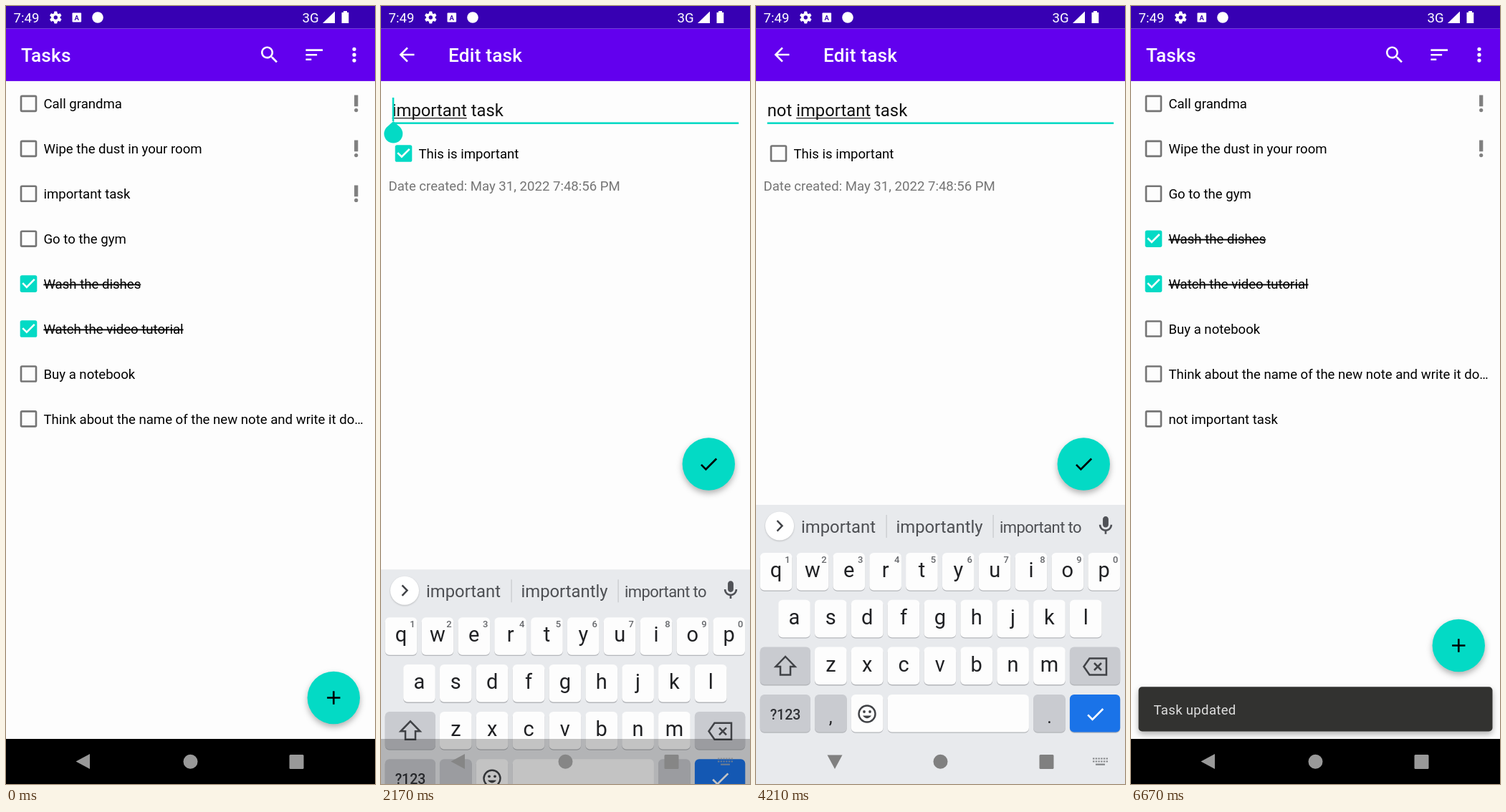
Recreate the animation shown at these times as an HTML page. Size 515 by 1087 pixels, loop 6.79 s.

```html
<!DOCTYPE html>
<html lang="en">
<head>
<meta charset="utf-8">
<title>Tasks</title>
<style>
  html, body { margin: 0; width: 100%; height: 100%; overflow: hidden; background: #fdfdfd; }
  svg { display: block; width: 100vw; height: 100vh; }
  text { font-family: Roboto, "Noto Sans", sans-serif; font-size: 18.6px; white-space: pre; }
  .bar { font-size: 26.2px; font-weight: 500; letter-spacing: .2px; fill: #fff; }
  .input { font-size: 23.84px; fill: #111; }
  .done { text-decoration: line-through; text-decoration-thickness: 1.2px; }
  .key { font-size: 29px; fill: #202124; text-anchor: middle; }
  .hint { font-size: 13px; font-weight: 500; fill: #66686c; text-anchor: middle; }
  .sug { font-size: 23.84px; fill: #4d4f53; text-anchor: middle; }
  .tight { font-size: 22px; letter-spacing: -.6px; }
  .line { fill: none; stroke: #404246; stroke-width: 2.5; }
  .lift { filter: drop-shadow(0 4px 4px rgba(0, 0, 0, .3)); }
</style>
</head>
<body>
<svg id="stage" viewBox="0 0 515 1087"></svg>
<script>
const LOOP = 6790, TEAL = '#03dac5', DP = 1.3113;
const T = { open: 1250, focus: 1960, kbIn: 2028, resize: 2060, uncheck: 3900, save: 4630, snack: 4650 };

// [time, text typed before the old title]
const TYPED = [[0, ''], [2760, 'n'], [2930, 'no'], [3070, 'not'], [3380, 'not ']];
// [time, suggestions, underline start, underline length]
const THREE = ['important', 'importantly', 'important to'];
const HELP = [
  [0, THREE, 0, 9], [2830, ['nimportant'], 0, 10], [3000, ['noimportant'], 0, 11],
  [3140, ['notimportant'], 0, 12], [3460, THREE, 4, 9]
];

const ICON = {
  search: 'M15.5 14h-.79l-.28-.27C15.41 12.59 16 11.11 16 9.5 16 5.91 13.09 3 9.5 3S3 5.91 3 9.5 5.91 16 9.5 16c1.61 0 3.09-.59 4.23-1.57l.27.28v.79l5 4.99L20.49 19zM9.5 14C7.01 14 5 11.99 5 9.5S7.01 5 9.5 5 14 7.01 14 9.5 11.99 14 9.5 14z',
  sort: 'M3 18h6v-2H3zM3 6v2h18V6zM3 13h12v-2H3z',
  more: 'M10 6a2 2 0 1 0 4 0a2 2 0 1 0-4 0M10 12a2 2 0 1 0 4 0a2 2 0 1 0-4 0M10 18a2 2 0 1 0 4 0a2 2 0 1 0-4 0',
  back: 'M20 11H7.83l5.59-5.59L12 4l-8 8 8 8 1.41-1.41L7.83 13H20z',
  check: 'M9 16.17L4.83 12l-1.42 1.41L9 19 21 7l-1.41-1.41z',
  plus: 'M19 13h-6v6h-2v-6H5v-2h6V5h2v6h6z',
  tick: 'M10 17l-5-5 1.41-1.41L10 14.17l7.59-7.59L19 8z',
  high: 'M10 3h4v12h-4zM10 19a2 2 0 1 0 4 0a2 2 0 1 0-4 0',
  mic: 'M12 14c1.66 0 3-1.34 3-3V5c0-1.66-1.34-3-3-3S9 3.34 9 5v6c0 1.66 1.34 3 3 3zm5-3c0 2.76-2.24 5-5 5s-5-2.24-5-5H5c0 3.53 2.61 6.43 6 6.92V21h2v-3.08c3.39-.49 6-3.39 6-6.92z'
};

const at = (x, y) => `transform="translate(${x} ${y})"`;
const rect = (x, y, w, h, fill, r = 0, more = '') =>
  `<rect x="${x}" y="${y}" width="${w}" height="${h}" rx="${r}" fill="${fill}" ${more}/>`;
const circle = (x, y, r, fill, more = '') => `<circle cx="${x}" cy="${y}" r="${r}" fill="${fill}" ${more}/>`;
const text = (x, y, s, cls = '', more = '') => `<text x="${x}" y="${y}" class="${cls}" ${more}>${s}</text>`;
const path = (d, more = 'class="line"') => `<path d="${d}" ${more}/>`;
const group = (id, body, more = '') => `<g id="${id}" ${more}>${body}</g>`;
const unit = (x, y, body) => `<g transform="translate(${x} ${y}) scale(${DP}) translate(-12 -12)">${body}</g>`;
const icon = (name, x, y, fill = '#fff') => unit(x, y, path(ICON[name], `fill="${fill}"`));

const box = (y, on) => unit(31.5, y, on
  ? rect(3, 3, 18, 18, TEAL, 2) + path(ICON.tick, 'fill="#fff"')
  : rect(4, 4, 16, 16, 'none', 1, 'stroke="#757575" stroke-width="2"'));

const row = ([label, flag], i) => {
  const y = 136.4 + 62.93 * i, done = flag === 'done';
  return box(y, done) + text(52.4, y + 7, label, done ? 'done' : '') +
    (flag === 'high' ? icon('high', 488.7, y, '#808080') : '');
};

const TOP = [['Call grandma', 'high'], ['Wipe the dust in your room', 'high']];
const REST = [
  ['Go to the gym'], ['Wash the dishes', 'done'], ['Watch the video tutorial', 'done'],
  ['Buy a notebook'], ['Think about the name of the new note and write it do…']
];
const rows = list => list.map(row).join('');

const fab = (id, name) => group(id, circle(0, 0, 36.7, TEAL, 'class="lift"') + icon(name, 0, 0, '#000'));

function statusBar() {
  let teeth = '';
  for (let a = 0; a < 360; a += 60) teeth += rect(-2.2, -8.4, 4.4, 5, '#fff', 1, `transform="rotate(${a})"`);
  return rect(0, 0, 515, 31.5, '#3700b3') +
    text(10.5, 22.6, '7:49', '', 'fill="#fff"') +
    `<g ${at(69.3, 16)}>${teeth}${circle(0, 0, 4.5, 'none', 'stroke="#fff" stroke-width="3.6"')}</g>` +
    rect(92.5, 9.5, 12.6, 13, '#fff', 1) +
    text(98.8, 19.5, 'A', '', 'fill="#3700b3" text-anchor="middle" style="font-size:9.5px;font-weight:700"') +
    circle(128, 16, 7.8, '#fff') +
    text(413.5, 22.6, '3G', '', 'fill="#fff"') +
    path('M442 24L459 7.5V24z', 'fill="#fff"') +
    path('M471 7h5v2h2.3v15h-9.8V9h2.5z', 'fill="#fff"');
}

function key(x, y, w, fill, label = '', hint = '') {
  const cx = x + w / 2;
  return rect(x, y + 1.3, w, 52.5, '#b4b6ba', 6) + rect(x, y, w, 52.5, fill, 6) +
    (label && text(cx, y + 34.2, label, 'key')) + (hint && text(cx + 16, y + 13.8, hint, 'hint'));
}

function keyboard() {
  const W = 44.7, STEP = 50.85, X = 5.7, GREY = '#c9cbd0', WHITE = '#fdfdfd', WIDE = 70.3;
  const ys = [764, 829.8, 895.6, 962];
  const col = i => X + STEP * i;
  const keys = (s, first, y, hints = '') =>
    [...s].map((c, i) => key(col(first + i), y, W, WHITE, c, hints[i])).join('');
  return rect(0, 697, 515, 400, '#e8eaed') +
    circle(33, 726.5, 20, '#fff', 'style="filter:drop-shadow(0 1px 1px rgba(0,0,0,.2))"') +
    path('M29.5 719l7 7.3-7 7.3') + group('sugs', '') + icon('mic', 488, 726, '#505257') +
    keys('qwertyuiop', 0, ys[0], '1234567890') + keys('asdfghjkl', .5, ys[1]) + keys('zxcvbnm', 1.5, ys[2]) +
    key(X, ys[2], WIDE, GREY) + path('M41 909l13.5 14H48v11.500H34V923h-6.500z') +
    key(col(8.5), ys[2], WIDE, GREY) + path('M457.500 923l8-11.500h23.500v23h-23.500zM472 918l10 10M482 918l-10 10') +
    key(X, ys[3], WIDE, GREY) +
    text(41, 996.5, '?123', '', 'fill="#303236" text-anchor="middle" style="font-size:19.5px;font-weight:500"') +
    key(col(1.5), ys[3], W, GREY) + text(104.3, 1002, ',', 'key', 'style="font-size:25px"') +
    key(col(2.5), ys[3], W, WHITE) +
    circle(155, 989, 11.5, 'none', 'stroke="#404246" stroke-width="2.400"') +
    circle(151, 986, 1.9, '#404246') + circle(159, 986, 1.9, '#404246') + path('M149 991.500q6 7.500 12 0z', 'fill="#404246"') +
    key(col(3.5), ys[3], W + STEP * 3, WHITE) +
    key(col(7.5), ys[3], W, GREY) + text(409.5, 1002, '.', 'key', 'style="font-size:25px"') +
    key(col(8.5), ys[3], WIDE, '#1a73e8') + icon('check', 473.5, 989.5);
}

const SWITCH = 'M470 1051.500h21M470 1055.500h21';
document.getElementById('stage').innerHTML =
  rect(0, 0, 515, 1087, '#fdfdfd') + rect(0, 31.5, 515, 73.4, '#6200ee') + statusBar() +
  group('list',
    text(21, 78, 'Tasks', 'bar') + icon('search', 367.8, 68.2) + icon('sort', 430.2, 68.2) + icon('more', 486, 68.2) +
    group('before', rows([...TOP, ['important task', 'high'], ...REST])) +
    group('after', rows([...TOP, ...REST, ['not important task']])) +
    group('snack',
      rect(10.5, 951.3, 494, 62.2, '#323230', 5, 'class="lift"') +
      text(31.5, 989.6, 'Task updated', '', 'fill="#dedede" letter-spacing=".3"')) +
    fab('add', 'plus')) +
  group('edit',
    icon('back', 36, 68) + text(94, 78, 'Edit task', 'bar') +
    text(15.7, 153.7, '', 'input', 'id="title"') +
    rect(15.7, 162.6, 483.5, 1.3, '#757575', 0, 'id="rule"') +
    group('focus',
      rect(15.7, 162.4, 483.5, 2.6, TEAL) + rect(0, 156, 0, 1.3, '#222', 0, 'id="under"') +
      rect(0, 128, 2.6, 33, TEAL, 0, 'id="caret"') +
      path('M17.300 161L26.500 169.300A13 13 0 1 1 8.100 169.300z', `id="handle" fill="${TEAL}"`)) +
    group('yes', box(206, true)) + group('no', box(206, false)) +
    text(52.4, 213, 'This is important') +
    text(10.5, 257.6, 'Date created: May 31, 2022 7:48:56 PM', '', 'fill="#757575"') +
    fab('ok', 'check')) +
  rect(0, 1024, 515, 63, '#000') +
  group('kb', keyboard()) +
  rect(0, 1024, 515, 63, '#000', 0, 'id="shade"') +
  group('nav',
    path('M97.500 1055.500l19.500-10.500v21z', 'id="tri"') + circle(257.5, 1055.7, 10, 'inherit') +
    rect(395.5, 1046, 20, 20, 'inherit', 1.5) +
    group('switch', path(SWITCH, 'fill="none" stroke="#85878a" stroke-width="2.200" stroke-dasharray="2.400 1.320"') +
      rect(474, 1058.6, 13, 2.2, '#85878a')));

const $ = {};
document.querySelectorAll('[id]').forEach(e => $[e.id] = e);
for (const e of $.nav.children) e.getAttribute('fill') === 'inherit' && e.removeAttribute('fill');

const pen = document.createElement('canvas').getContext('2d');
const width = s => { pen.font = '23.84px Roboto, "Noto Sans", sans-serif'; return pen.measureText(s).width; };
const part = (t, start, len) => Math.min(1, Math.max(0, (t - start) / len));
const last = (table, t) => table.filter(r => r[0] <= t).pop();
const show = (e, on) => e.style.display = on ? '' : 'none';
const move = (e, x, y) => e.setAttribute('transform', `translate(${x} ${y})`);

function drawEdit(t) {
  const [typedAt, typed] = last(TYPED, t), [, words, from, len] = last(HELP, t);
  const title = typed + 'important task', focused = t >= T.focus;
  $.title.textContent = title;
  show($.rule, !focused);
  show($.focus, focused);
  show($.handle, !typed);
  show($.caret, (t - Math.max(typedAt, T.focus)) % 1000 < 500);
  $.caret.setAttribute('x', 15.7 + width(typed));
  $.under.setAttribute('x', 15.7 + width(title.slice(0, from)));
  $.under.setAttribute('width', width(title.slice(from, from + len)));
  show($.yes, t < T.uncheck);
  show($.no, t >= T.uncheck);
  move($.ok, 457.3, t < T.resize ? 966.5 : 640);

  const key = words.join();
  if ($.sugs.dataset.key === key) return;
  $.sugs.dataset.key = key;
  $.sugs.innerHTML = words.length === 1 ? text(256.5, 735.5, words[0], 'sug')
    : words.map((w, i) => text(115 + 141 * i, 735.5, w, i === 2 ? 'sug tight' : 'sug')).join('') +
      rect(181.5, 711, 1.2, 32, '#c6c8cc') + rect(330.5, 711, 1.2, 32, '#c6c8cc');
}

function drawList(t) {
  const saved = t >= T.save, k = part(t, T.snack, 150), s = .8 + .2 * (1 - (1 - k) ** 2);
  show($.before, !saved);
  show($.after, saved);
  show($.snack, k > 0);
  $.snack.setAttribute('opacity', k);
  $.snack.setAttribute('transform', `translate(257.5 982.4) scale(${s}) translate(-257.5 -982.4)`);
  move($.add, 457.3, k > 0 ? 924.6 - 31.1 * s : 966.5);
}

function drawKeyboard(t) {
  const a = part(t, T.kbIn, 285), b = part(t, T.save, 200);
  const up = b > 0 ? 1 - b ** 2.2 : 1 - (1 - a) ** 2.1;
  show($.kb, up > 0);
  move($.kb, 0, 390 * (1 - up));
  $.kb.setAttribute('opacity', b > 0 ? 1 - b : Math.min(1, 2 * a));
  $.shade.setAttribute('opacity', 1 - up);
  $.switch.setAttribute('opacity', t < T.save ? up : 0);
  const tone = Math.round(153 - 25 * up);
  $.nav.setAttribute('fill', `rgb(${tone},${tone},${tone})`);
  const turn = part(t, 2200, 150) - part(t, T.save, 144);
  $.tri.setAttribute('transform', `rotate(${-90 * turn} 109 1054.500)`);
}

function draw() {
  const t = performance.now() % LOOP, editing = t >= T.open && t < T.save;
  show($.edit, editing);
  show($.list, !editing);
  drawEdit(t);
  drawList(t);
  drawKeyboard(t);
  requestAnimationFrame(draw);
}
draw();
</script>
</body>
</html>
```
